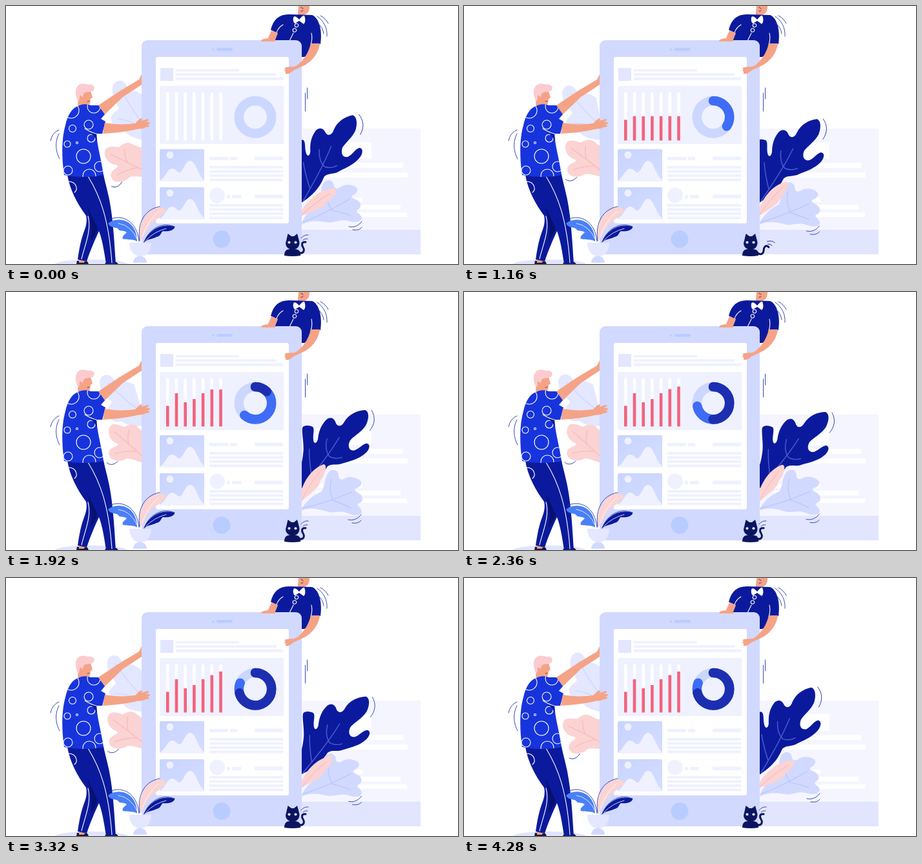
An HTML page that plays this animation: 700x400 px, repeating every 4.32 s.

```html
<!DOCTYPE html>
<html lang="en">
<head>
<meta charset="utf-8">
<title>Tablet report</title>
<style>
html,body{margin:0;width:100%;height:100%;overflow:hidden;background:#fff}
svg{display:block;width:700px;height:400px}
.navy{fill:#0b1a9c}
.skin{fill:#f5a387}
.pink{fill:#fbd3d3}
.pale{fill:#d2d9ff}
.mist{fill:#e3e7ff}
.white{fill:#fff}
.line{fill:none;stroke-linecap:round;stroke-linejoin:round}
.ink{stroke:#2438a6;stroke-width:.9}
.chalk{stroke:#fff;stroke-width:1.1}
</style>
</head>
<body>
<svg viewBox="0 0 700 400">
  <defs>
    <linearGradient id="sky" x1="0" y1="0" x2="1" y2="1">
      <stop offset="0" stop-color="#c8d4ff"/><stop offset="1" stop-color="#d5ddff"/>
    </linearGradient>
    <path id="torso" d="M112 155C118 151 127 152 131 154L143 154L153 168L147 175L154 179L149 198L140 198C141 216 148 240 151 262C135 266 108 266 90 262C86 235 86 205 92 185C95 170 102 158 112 155Z"/>
    <clipPath id="torsoClip"><use href="#torso"/></clipPath>
    <g id="photo">
      <rect x="238" y="222" width="69" height="50" rx="2" fill="url(#sky)"/>
      <circle cx="254" cy="231" r="5.5" fill="#eff1ff"/>
      <path fill="#eff1ff" d="M239 270C247 266 250 252 257 252C263 252 266 259 269 258C275 256 278 240 285 240C294 240 297 262 306 269L306 272H239Z"/>
    </g>
  </defs>

  <!-- back panel -->
  <rect x="440" y="190" width="202" height="158" fill="#f4f5ff"/>
  <rect x="440" y="347" width="202" height="38" fill="#e2e5fe"/>
  <path class="white" d="M480 211h86v26h-86zM480 243h135v8h-135zM480 258h142v8h-142zM480 297h72v7h-72zM480 308h131v7.500h-131zM480 320h141v7h-141z"/>

  <!-- foliage on the left, drawn at full swing -->
  <g id="mistLeaf"><g transform="rotate(-16 212 205)">
    <path class="mist" d="M216 208C196 206 186 198 181 191C170 192 163 183 163 174C163 165 173 164 175 158C170 150 163 140 165 126C168 113 181 113 186 122C190 129 188 136 193 133C199 129 207 134 216 142Z"/>
    <path class="line" stroke="#cfd8ff" stroke-width="1.4" d="M178 129C188 149 199 166 212 182M173 175C185 176 197 180 209 189"/>
  </g></g>
  <g id="pinkLeaf">
    <path class="pink" d="M163 206C171 202 178 207 184 209C189 206 193 205 199 206C206 208 208 216 222 221V267C204 264 196 258 187 258C179 263 168 262 162 257C157 251 159 244 165 241C172 238 176 237 172 234C163 231 157 220 160 211Z"/>
    <path class="line" stroke="#f8bcbe" stroke-width="1.4" d="M168 216C182 228 196 240 213 257M191 214C189 222 188 228 190 235M169 250C178 247 189 246 202 247"/>
    <path class="line ink" d="M156 264C161 269 168 267 173 262"/>
  </g>

  <!-- foliage on the right, drawn at full swing -->
  <g id="navyLeaf">
    <path class="navy" d="M440 302C457 280 461 262 463 245C464 230 461 216 463 210C466 206 474 207 479 210C482 214 478 222 479 231C480 237 484 236 486 229C488 215 493 206 501 199C508 195 513 198 515 206C518 212 524 211 528 204C535 193 548 187 561 187C568 190 566 202 561 211C554 221 543 226 536 233C531 241 533 249 541 249C548 248 554 240 561 239C567 240 566 247 560 253C550 262 536 265 524 268C514 272 506 267 499 272C492 282 484 293 458 304Z"/>
    <path class="line" stroke="#4a5fd0" stroke-width="1.4" d="M460 302C481 278 502 254 519 228M500 229C497 240 498 251 503 257Q512 262 522 259M472 244Q471 262 474 286"/>
    <path class="line ink" d="M571 188C577 199 575 210 567 219"/>
  </g>
  <g id="paleLeaf">
    <path class="pale" d="M456 339C466 322 476 315 489 309C494 300 493 288 500 279C507 273 515 277 515 284C515 291 520 292 525 289C533 285 544 288 549 293C553 298 548 303 541 305C538 309 545 310 550 315C554 321 552 326 546 328C541 331 551 334 551 341C549 348 538 347 530 343C518 338 508 343 499 341C488 338 474 332 456 339Z"/>
    <path class="line" stroke="#b9c8ff" stroke-width="1.4" d="M460 335C486 329 510 321 536 310M504 290C501 301 502 312 506 321M503 322C514 326 524 329 534 335"/>
  </g>
  <g id="blushLeaf">
    <path class="pink" d="M453 329C456 300 470 275 492 267C497 268 495 276 493 281C492 288 486 290 486 296C482 306 470 313 453 329Z"/>
    <path class="line" stroke="#f8bcbe" d="M457 325C465 308 475 292 487 277"/>
  </g>
  <path id="paleMarks" class="line ink" d="M531 342C538 344 546 341 551 334M537 347C543 348 548 347 551 343"/>

  <!-- man behind the tablet -->
  <path class="skin" d="M453 0H470C470 7 468 12 463 13V20H452V10Z"/>
  <path class="line" stroke="#283070" d="M457 2L460 4M457 8Q459 9 460 7"/>
  <path class="skin" d="M411 38L421 42L417 54H404Z"/>
  <path class="navy" d="M410 37C414 20 424 12 440 13L474 14C486 19 490 40 487 59L472 60C470 70 468 76 462 79L440 79V55H416L421 42Z"/>
  <path class="white" d="M454 21C450 16 446 15 445 18C444 23 446 27 448 27L454 23L461 28C464 26 464 19 462 15C460 14 457 18 454 21Z"/>
  <path class="line chalk" d="M447.200 30a2.800 2.800 0 1 0 5.600 0a2.800 2.800 0 1 0 -5.600 0M444.200 37.500a2.800 2.800 0 1 0 5.600 0a2.800 2.800 0 1 0 -5.600 0M445 42L439 54M429 29Q422 33 419 41M473 42Q475 51 472 60"/>

  <!-- tablet -->
  <rect class="pale" x="210" y="53" width="248" height="332" rx="9"/>
  <rect class="white" x="232" y="79" width="206" height="258" rx="3"/>
  <g fill="#b9ccff">
    <circle cx="320.500" cy="67.500" r="1.8"/>
    <rect x="326" y="65" width="25" height="4.500" rx="2.2"/>
    <circle cx="334" cy="361.500" r="13.500"/>
  </g>
  <rect x="239" y="96" width="20" height="20" fill="#e2e6ff"/>
  <rect x="238" y="124" width="192" height="90" rx="2" fill="#eff1ff"/>
  <g id="rows" fill="#eff1ff"><circle cx="327" cy="293.500" r="12"/></g>
  <use href="#photo"/><use href="#photo" y="59"/>
  <g id="bars"></g>
  <g class="line" stroke-width="14.500" transform="rotate(-90 386 172.200)">
    <circle cx="386" cy="172.200" r="25.200" stroke="#ccd7ff"/>
    <circle id="arcA" cx="386" cy="172.200" r="25.200" stroke="#3f6cf6" pathLength="360"/>
    <circle id="arcB" cx="386" cy="172.200" r="25.200" stroke="#1d2fb0" pathLength="360"/>
  </g>
  <path class="skin" d="M472 58L486 58C484 75 472 88 458 94L445 100C441 104 437 106 433 105C432 104 434 103 433 102C431 101 431 99 433 98C430 97 432 95 435 95C441 93 446 96 452 91C460 84 468 75 472 58Z"/>
  <path class="skin" d="M395 54C396 51 402 50 409 50L417 53V55H396Z"/>
  <path class="line ink" d="M482 26Q491 33 492 43M482 16C492 23 498 34 497 47M487 15Q495 19 499 27M466.500 127V144M463.500 135V163"/>

  <!-- man on the left -->
  <ellipse cx="132" cy="401" rx="57" ry="8" fill="#e0e4fe"/>
  <path fill="#151a3d" d="M109 400L110 395L126 396L128 400ZM153 400L155 397H171L174 400Z"/>
  <path class="skin" d="M113 392H123L121 398H113Z"/>
  <path class="navy" d="M95 262C99 285 110 306 124 325C126 334 124 342 120 352C115 366 113 380 111 393L125 396C130 380 138 362 144 349C150 365 152 382 155 399L170 400C168 370 166 330 160 300C157 285 153 272 151 261Z"/>
  <path fill="#07116f" d="M126 311L142 345Q137 358 131 365Q135 340 126 311Z"/>
  <path class="line chalk" d="M127 264C146 295 159 330 164 398M127 326C133 347 122 371 117 392M96 272Q107 272 109 281Q110 286 106 289"/>
  <path class="skin" d="M143 154L176 132L206 114L210 106V122L181 141L152 169Z"/>
  <path class="skin" d="M112 140L118 134L131 132L134 142L131 144L130 151C128 154 124 153 123 155Q116 157 111 154Z"/>
  <path fill="#fbcbd0" d="M112 148C107 140 106 128 112 123C117 119 123 121 128 122C134 121 139 125 136 130C134 134 126 132 121 135L118 142C116 136 113 138 114 144Z"/>
  <path class="line" stroke="#8b3a46" d="M126 148L129 147.500"/>
  <use href="#torso" fill="#1734dc"/>
  <g class="line chalk" clip-path="url(#torsoClip)">
    <circle cx="101" cy="162" r="12"/><circle cx="136" cy="156" r="10"/>
    <circle cx="128" cy="184" r="7"/><circle cx="103" cy="190" r="5.500"/>
    <circle cx="95" cy="214" r="5"/><circle cx="110" cy="212" r="1.500"/>
    <circle cx="120" cy="233" r="11"/><circle cx="145" cy="249" r="8"/>
    <circle cx="96" cy="255" r="7"/><circle cx="129" cy="263" r="10"/>
    <circle cx="132" cy="205" r="6"/>
  </g>
  <path class="navy" d="M121 190Q131 195 140 197L141 211Q138 200 121 190Z"/>
  <path class="line chalk" d="M122 190Q131 196 140 198"/>
  <path class="skin" d="M153 181C168 184 185 184 200 182L206 176C210 173 212 174 210 178L220 175C222 176 221 178 216 180L222 180C224 182 222 184 217 184L222 185C223 187 220 188 216 188C212 191 207 190 203 191C185 195 166 197 150 198Z"/>
  <path class="line ink" d="M82 192Q71 197 69 209M82 198C75 211 77 226 83 237"/>

  <!-- potted plant -->
  <path class="mist" d="M191 367H225C225 379 219 388 208 388C198 388 191 379 191 367Z"/>
  <path class="pale" d="M197 398A10.500 10.500 0 0 1 218 398Z"/>
  <path fill="#4a80f7" d="M158 337C168 328 188 329 197 343C202 351 203 358 203 365C198 361 189 363 181 361C179 357 184 354 187 351C182 347 176 350 174 346C171 342 161 345 158 337Z"/>
  <path class="pink" d="M207 365C205 338 215 316 239 312C249 313 250 321 242 323C239 326 237 330 231 332C225 337 218 344 208 365Z"/>
  <path class="navy" d="M213 367C221 349 237 336 261 342C262 347 252 350 243 349C239 352 240 357 233 358C227 362 220 360 213 367Z"/>
  <path class="line ink" d="M160 331C180 322 203 333 206 365M207 364C203 337 214 315 238 311M214 366C220 349 238 333 261 342"/>
  <path class="line" stroke="#fff" stroke-width=".8" d="M174 337Q194 340 204 363M211 358Q219 333 237 318M217 363Q229 350 248 345"/>

  <!-- cat -->
  <g id="tail" class="line">
    <path stroke="#0b155f" stroke-width="3" d="M454 383C463 384 462 377 460 374S457 365 464 366"/>
    <path class="ink" d="M457 360Q462 354 468 355M460 363Q463 360 467 361"/>
  </g>
  <path fill="#0b155f" d="M434 364L436.500 353L442 357H446L451 353L454 364C456 371 451 377 447 377C454 377 457 381 456 387Q444 389 431 387C431 380 434 377 440 377C436 376 431 371 434 364Z"/>
  <g fill="#e3e9ff"><circle cx="438.500" cy="366.500" r="2.1"/><circle cx="448.500" cy="366.500" r="2.1"/></g>
</svg>
<script>
const LOOP = 4320;
const $ = id => document.getElementById(id);

function rect(parent, x, y, width, height, fill) {
  const el = document.createElementNS('http://www.w3.org/2000/svg', 'rect');
  for (const [k, v] of Object.entries({x, y, width, height})) el.setAttribute(k, v);
  if (fill) el.setAttribute('fill', fill);
  return $(parent).appendChild(el);
}

const clamp = u => Math.max(0, Math.min(1, u));
const inOut = u => (1 - Math.cos(Math.PI * u)) / 2;
const sineOut = u => Math.sin(Math.PI / 2 * u);
const powOut = (t, start, length, power) => 1 - (1 - clamp((t - start) / length)) ** power;

// Goes 0 to 1 at the peak time, then back to 0 at the end.
function swing(t, peak, up, down = up, end = LOOP) {
  return t < peak ? up(t / peak) : down(clamp((end - t) / (end - peak)));
}

// Placeholder text
[98, 156, 166].forEach((w, i) => rect('rows', 263, 98 + i * 6.2, w, 3.5 + i / 2));
for (const y of [234, 293]) {
  rect('rows', 385, y - .5, 44, 5.5);
  for (let i = 0; i < 4; i++) rect('rows', 315, y + 14 + i * 6.5, 114, 4);
}
rect('rows', 315, 234, 29, 5);
rect('rows', 347, 234, 11, 5);
rect('rows', 342, 293, 5, 5);
rect('rows', 350, 293, 14, 5);

const bars = [32, 51.5, 37.5, 42.5, 51.5, 58, 63.5].map((cap, i) => {
  const x = 248 + i * 13.7;
  rect('bars', x, 134, 4.6, 74.5, '#fff');
  return {cap, el: rect('bars', x, 208.5, 4.6, 0, '#f2627c')};
});

function turn(id, deg, pivot) {
  $(id).setAttribute('transform', `rotate(${deg} ${pivot})`);
}

function showArc(id, deg) {
  $(id).setAttribute('stroke-dasharray', deg + ' 400');
  $(id).style.display = deg > 0 ? '' : 'none';
}

function draw(t) {
  const height = 63.5 * powOut(t, 460, 2700, 3);
  for (const {cap, el} of bars) {
    const h = Math.min(height, cap);
    el.setAttribute('y', 208.5 - h);
    el.setAttribute('height', h);
  }
  showArc('arcA', 292 * powOut(t, 470, 2850, 2));
  showArc('arcB', 256 * powOut(t, 1810, 1200, 2));

  const sway = swing(t, 2000, inOut);
  const lean = swing(t, 2750, inOut, sineOut);
  const lift = swing(t, 2360, sineOut);
  turn('mistLeaf', 16 * (1 - sway), '212 205');
  turn('paleLeaf', -8 * (1 - sway), '460 335');
  turn('blushLeaf', 20 * (1 - sway), '456 325');
  turn('navyLeaf', -11.5 * (1 - lean), '460 300');
  turn('pinkLeaf', -16 * (1 - lift), '215 245');
  $('paleMarks').setAttribute('transform', `translate(${-sway} ${11 * sway})`);
  turn('tail', 42 * swing(t, 700, inOut, sineOut, 1840), '455 383');
}

const start = performance.now();
function tick() {
  draw((performance.now() - start) % LOOP);
  requestAnimationFrame(tick);
}
draw(0);
requestAnimationFrame(tick);
</script>
</body>
</html>
```
